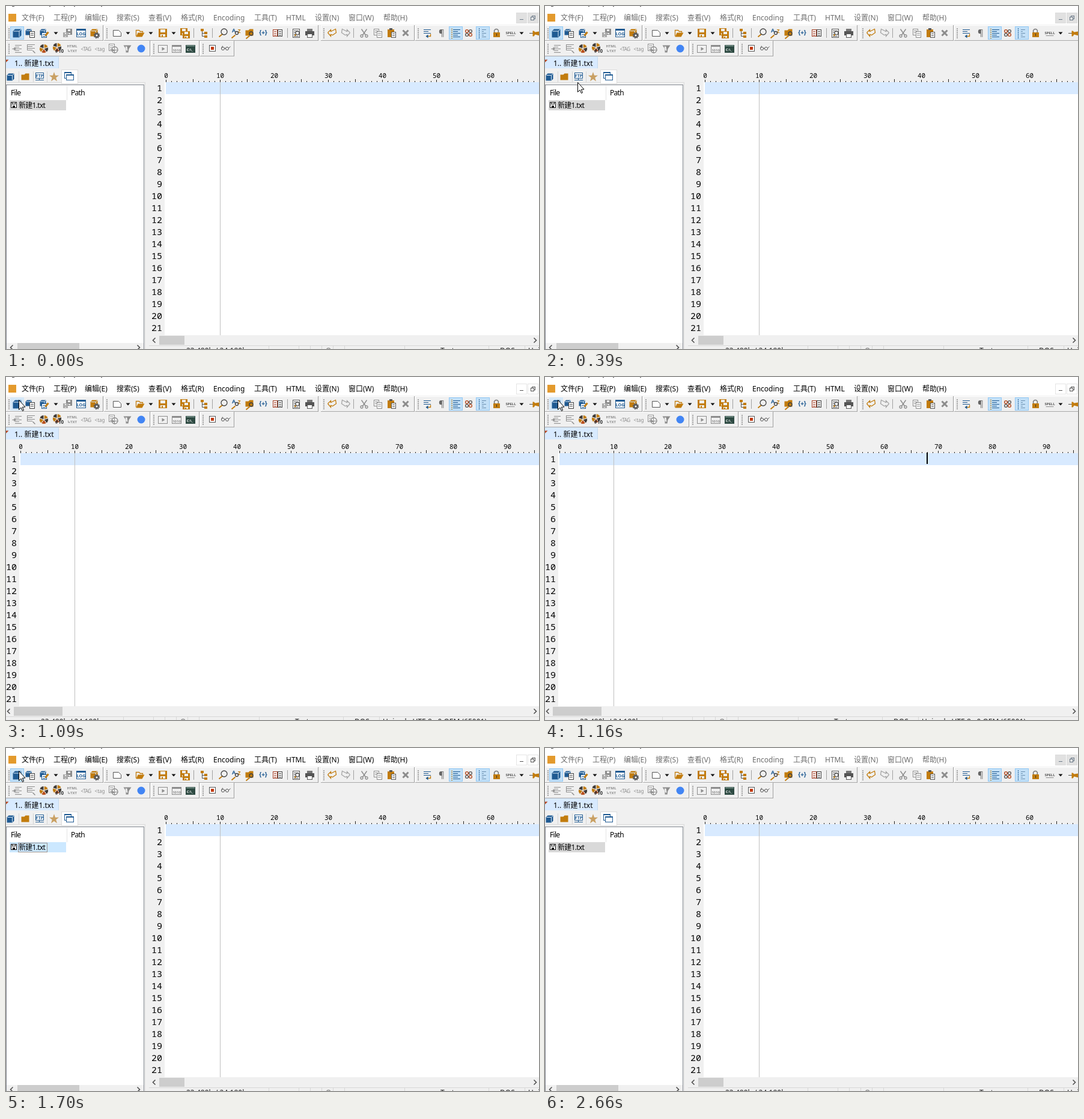
Animation, 887 px wide and 572 px high, one loop 2.73 s. Source, as an HTML page with a canvas:

```html
<!DOCTYPE html>
<html lang="zh-CN">
<head>
<meta charset="utf-8">
<style>
html, body { margin: 0; width: 100%; height: 100%; overflow: hidden; background: #f0f0f0; }
canvas { display: block; }
</style>
</head>
<body>
<canvas id="stage" width="887" height="572"></canvas>
<script>
const g = document.getElementById('stage').getContext('2d');
const LOOP = 2730, W = 887, H = 572, SHIFT = 242;
const UI = '"Noto Sans", "Noto Sans CJK SC", "Noto Sans CJK", sans-serif';
const MONO = '"Noto Sans Mono", "DejaVu Sans Mono", monospace';
const BLUE = '#1f5a92', ORANGE = '#c27c0e', GRAY = '#8c8c8c', DARK = '#404040';
const FACE = '#f0f0f0', MARK = '#d8eaff';

// Moments of the story
const FOCUS = 1000, HIDE = 1080, CARET = 1160, PRESS = 1640, SHOW = 1700, BLUR = 2660;

// Pointer: time, x, y; each pose holds until the next
const path = [
  [70, 484, 387], [140, 372, 320], [210, 240, 242], [270, 138, 181], [330, 76, 143],
  [390, 54, 127], [460, 53, 112], [540, 53, 98], [620, 47, 78], [690, 35, 53],
  [770, 27, 39], [920, 21, 38], [1930, 60, 78], [2000, 260, 232], [2080, 777, 553], [2170]
];

function rect(x, y, w, h, c) { g.fillStyle = c; g.fillRect(x, y, w, h); }
function frame(x, y, w, h, c, fill) {
  if (fill) rect(x, y, w, h, fill);
  g.strokeStyle = c; g.lineWidth = 1; g.strokeRect(x + .5, y + .5, w - 1, h - 1);
}
function trace(p) {
  g.beginPath();
  for (let i = 0; i < p.length; i += 2) g.lineTo(p[i] + .5, p[i + 1] + .5);
}
function line(c, w, ...p) { trace(p); g.strokeStyle = c; g.lineWidth = w; g.stroke(); }
function poly(c, ...p) { trace(p); g.closePath(); g.fillStyle = c; g.fill(); }
function disc(x, y, r, c) { g.beginPath(); g.arc(x, y, r, 0, 7); g.fillStyle = c; g.fill(); }
function ring(x, y, r, c, w = 1.3) {
  g.beginPath(); g.arc(x, y, r, 0, 7); g.strokeStyle = c; g.lineWidth = w; g.stroke();
}
function text(s, x, y, c = '#000', size = 12, font = UI, align = 'left', gap = 0) {
  g.font = size + 'px ' + font; g.textAlign = align; g.letterSpacing = gap + 'px';
  g.fillStyle = c; g.fillText(s, x, y);
}
function label(s, x, y, c, size) { text(s, x, y, c, 'bold ' + size, UI, 'center'); }

// Icons, placed by their centre
function cube(x, y, c = BLUE, r = 7) {
  poly(c, x - r, y - r / 2, x - r / 2, y - r, x + r, y - r, x + r, y + r / 2, x + r / 2, y + r, x - r, y + r);
  line('#dcebf7', 1, x - r + 1, y - r / 2, x + r / 2, y - r / 2, x + r / 2, y + r - 1);
  line('#dcebf7', 1, x + r / 2, y - r / 2, x + r, y - r);
}
function page(x, y, c, w = 9, h = 11) {
  frame(x - (w >> 1), y - (h >> 1), w, h, c, '#fff');
  for (let i = 3; i < h - 2; i += 3) rect(x - (w >> 1) + 2, y - (h >> 1) + i, w - 4, 1, c);
}
function floppy(x, y, c, r = 7) {
  rect(x - r, y - r, 2 * r, 2 * r, c);
  rect(x - r + 3, y - r + 1, 2 * r - 6, r - 2, FACE);
  rect(x - r + 3, y + 2, 2 * r - 6, r - 3, FACE);
  rect(x - 2, y + 3, 2, r - 4, c);
}
function folder(x, y, c = ORANGE) {
  poly(c, x - 7, y - 4, x - 2, y - 4, x, y - 6, x + 6, y - 6, x + 6, y + 5, x - 7, y + 5);
}
function lens(x, y, c, r = 4) {
  line(ORANGE, 2, x - 7, y + 6, x - 1, y + 1);
  ring(x + 2, y - 2, r, c);
}
function drop(x, y) { poly('#111', x - 4, y - 2, x + 3, y - 2, x - .5, y + 2); }
function rows(x, y, c, n = 5, w = 11) {
  for (let i = 0; i < n; i++) rect(x - 5, y - 6 + i * 3, i % 2 ? w - 4 : w, 1, c);
}
function pie(x, y) {
  [ORANGE, '#3f3a36', '#b8501e', ORANGE, '#3f3a36'].forEach((c, i) => {
    g.beginPath(); g.moveTo(x, y);
    g.arc(x, y, 7.5, i * 1.257 - 1.57, i * 1.257 - .31);
    g.closePath(); g.fillStyle = c; g.fill();
    g.strokeStyle = FACE; g.lineWidth = 1; g.stroke();
  });
}
function back(x, y, c, d) {
  line(c, 1.3, x - 7 * d, y - 1, x - 2 * d, y - 6, x - 2 * d, y - 3, x + 6 * d, y - 7,
    x + 7 * d, y - 1, x + 1 * d, y + 3, x - 2 * d, y + 2, x - 2 * d, y + 5, x - 7 * d, y - 1);
}
function pressed(x, fill = '#c3e0f7', edge = '#90c8f6') { frame(x, 34, 23, 22, edge, fill); }
function sep(x) { rect(x, 37, 1, 16, '#a0a0a0'); }
function band(x, y, end) {
  rect(x, y + 25, end - x, 1, '#a8a8a8');
  rect(end - 1, y, 1, 26, '#a0a0a0');
  rect(x, y, 1, 25, '#fff'); rect(x, y, end - x - 1, 1, '#fff');
  for (let i = 5; i < 22; i += 3) rect(x + 4, y + i, 2, 2, '#a6a6a6');
}

function menu(active) {
  rect(0, 0, W, 31, '#fff');
  [10, 72, 96, 113, 158].forEach((x, i) => rect(x, 0, i ? 2 : 4, 1, '#555'));
  rect(4, 13, 13, 13, '#e39a2d');
  const c = active ? '#000' : '#6d6d6d';
  const items = ['文件(F)', '工程(P)', '编辑(E)', '搜索(S)', '查看(V)', '格式(R)', 'Encoding',
    '工具(T)', 'HTML', '设置(N)', '窗口(W)', '帮助(H)'];
  [26, 79, 131, 184, 237, 291, 345, 413, 466, 514, 570, 628].forEach((x, i) => text(items[i], x, 24, c));
  for (const x of [849, 868]) frame(x, 11, 18, 18, active ? '#e5e5e5' : '#dcdcdc', active ? '#fff' : '#e1e1e1');
  const m = active ? '#555' : '#6c7a89';
  rect(855, 22, 6, 1, m);
  frame(875, 16, 6, 6, m); frame(873, 18, 6, 6, m, active ? '#fff' : '#e1e1e1'); rect(873, 18, 6, 1, m);
}

function topBar(panel) {
  const y = 45;
  band(0, 32, 162); band(163, 32, 520); band(524, 32, 680); band(681, 32, 890);
  panel ? pressed(7) : pressed(7, '#d5e8f8', '#d5e8f8');
  cube(18, y);
  cube(37, y - 2, BLUE, 5); page(43, y + 2, DARK);
  cube(61, y - 2, BLUE, 5); page(63, y + 3, BLUE, 9, 9); line(ORANGE, 3, 65, 49, 70, 43);
  drop(83, y);
  floppy(105, y - 2, GRAY, 5); floppy(99, y + 3, '#aaa', 4);
  frame(117, 38, 16, 14, BLUE, '#fff'); rect(117, 38, 16, 3, BLUE); label('LOG', 125, 49, BLUE, 7);
  cube(146, y - 1, ORANGE, 6); disc(151, 49, 4, '#5a5a5a'); disc(151, 49, 1.5, '#fff');
  g.setLineDash([2, 1.5]); ring(151, 49, 4.5, '#5a5a5a', 1.5); g.setLineDash([]);

  poly('#fff', 178, 40, 187, 40, 191, 44, 191, 50, 178, 50);
  line('#555', 1, 178, 40, 187, 40, 191, 44, 191, 50, 178, 50, 178, 40);
  drop(203, y);
  line(ORANGE, 1.3, 216, 50, 216, 40, 221, 40, 223, 42, 227, 42, 227, 44);
  poly(ORANGE, 216, 51, 219, 44, 230, 44, 226, 51);
  drop(241, y); floppy(261, y, ORANGE); drop(279, y);
  floppy(296, y - 2, ORANGE, 6); floppy(300, y + 3, ORANGE, 6); sep(312);
  line('#555', 1, 326, 40, 326, 50, 331, 50); line('#555', 1, 326, 45, 331, 45);
  rect(324, 38, 5, 4, ORANGE); rect(330, 43, 5, 4, ORANGE); rect(330, 49, 5, 4, ORANGE); sep(343);
  lens(361, y, DARK, 5);
  label('A', 379, 44, BLUE, 9); label('Z', 388, 45, ORANGE, 8); lens(382, 47, DARK, 2.5);
  folder(405, 44); lens(406, 48, DARK, 3);
  label('{+}', 428, 48, BLUE, 10);
  page(448, y, '#a33b20', 8, 12); page(456, y, DARK, 8, 12); sep(468);
  page(483, y, '#555', 12, 15); disc(485, 45, 3, '#fff'); ring(485, 45, 3, DARK, 1.2); line(ORANGE, 2, 480, 49, 482, 47);
  rect(501, 38, 9, 5, '#777'); rect(498, 42, 15, 7, '#555'); frame(501, 46, 9, 7, '#555', '#fff');

  back(542, y, ORANGE, 1); back(565, y, '#a5a5a5', -1); sep(578);
  line(GRAY, 1.4, 591, 38, 598, 48); line(GRAY, 1.4, 600, 38, 593, 48);
  ring(592, 50, 2, GRAY); ring(600, 50, 2, GRAY);
  page(616, y - 2, GRAY, 9, 11); page(621, y + 2, GRAY, 9, 11);
  rect(635, 39, 11, 13, ORANGE); rect(638, 37, 5, 3, '#555'); page(645, y + 3, '#555', 8, 10);
  line(GRAY, 3, 660, 40, 669, 49); line(GRAY, 3, 669, 40, 660, 49);

  rows(700, y, BLUE, 3, 12); line(ORANGE, 1.4, 706, 46, 706, 50, 699, 50); poly(BLUE, 698, 50, 702, 47, 702, 53);
  text('¶', 725, 50, '#666', 15, UI, 'center');
  pressed(737); rows(749, y, BLUE, 5, 12);
  for (let i = 38; i < 54; i += 3) rect(741, i, 2, 1, ORANGE);
  ring(767, 42, 2.4, '#b3471d'); ring(773, 42, 2.4, '#555'); ring(767, 48, 2.4, '#555'); ring(773, 48, 2.4, '#b3471d');
  pressed(782); rows(797, y, '#6b8fb0', 5, 7);
  for (let i = 37; i < 54; i += 3) rect(787, i, 1, 2, BLUE);
  ring(816, 42, 3.5, '#777', 1.6); rect(811, 44, 11, 8, ORANGE); rect(816, 46, 1, 4, '#333');
  label('SPELL', 840, 47, '#555', 6); line(GRAY, 1, 833, 49, 846, 49); drop(858, y);
  rect(871, 45, 6, 1, '#555'); poly(ORANGE, 876, 41, 878, 41, 880, 43, 887, 42, 887, 49, 880, 47, 878, 50, 876, 50);
}

function lowBar() {
  const y = 71;
  band(0, 58, 240); band(241, 58, 322); band(323, 58, 380);
  rows(20, y, GRAY, 5, 11); line(GRAY, 1.3, 10, 71, 15, 71); poly(GRAY, 13, 68, 17, 71, 13, 74);
  rows(41, y - 1, GRAY, 4, 12); rect(35, 64, 1, 10, GRAY); line(GRAY, 1.5, 44, 74, 48, 78);
  pie(63, 71); pie(85, 69); label('#10', 89, 78, '#333', 8);
  label('HTML', 110, 69, GRAY, 6); label('↳TXT', 110, 77, GRAY, 6);
  text('<TAG', 133, 75, GRAY, 8, UI, 'center', -.5); text('<tag', 156, 75, GRAY, 8, UI, 'center');
  page(176, 69, GRAY, 10, 12); ring(181, 73, 5, GRAY); line(GRAY, 1, 176, 73, 186, 73); line(GRAY, 1, 180, 68, 180, 78);
  poly(GRAY, 195, 65, 208, 65, 204, 71, 203, 77, 199, 77, 199, 71);
  poly(FACE, 198, 67, 201, 67, 202, 74, 200, 74);
  disc(225, 71, 6.5, '#4285f4');
  frame(253, 65, 16, 13, GRAY); poly(GRAY, 259, 68, 264, 71, 259, 74);
  frame(276, 65, 16, 13, GRAY); rect(276, 65, 16, 3, GRAY); label('1010', 284, 76, GRAY, 6);
  rect(299, 65, 16, 13, '#2d4a42'); rect(300, 66, 14, 1, '#9db5ad'); label('C:\\_', 306, 75, '#fff', 6);
  frame(338, 65, 11, 11, '#555', '#fff'); rect(341, 68, 5, 5, '#c23a12');
  ring(361, 71, 2.5, '#555', 1); ring(368, 71, 2.5, '#555', 1);
  line('#555', 1, 363, 70, 365, 70); line('#555', 1, 358, 70, 360, 66); line('#555', 1, 370, 70, 373, 67);
}

function arrow(x, y, d) { line('#505050', 1.6, x + 2 * d, y - 4, x - 2 * d, y, x + 2 * d, y + 4); }

function sidePanel(focus) {
  rect(0, 127, 231, 1, '#dcdcdc');
  rect(231, 127, 1, H, '#dcdcdc');
  for (const x of [21, 45, 68]) rect(x, 109, 1, 18, '#d5d5d5');
  frame(92, 106, 28, 24, '#dcdcdc', '#fff');
  cube(7, 118, BLUE, 6); folder(32, 118);
  frame(49, 111, 14, 10, BLUE, '#fff'); label('FTP', 56, 119, BLUE, 7);
  rect(55, 121, 1, 3, BLUE); rect(49, 123, 14, 1, BLUE);
  const star = [];
  for (let i = 0; i < 10; i++) {
    const r = i % 2 ? 3.4 : 8.5, a = i * Math.PI / 5;
    star.push(79.5 + r * Math.sin(a), 118 - r * Math.cos(a));
  }
  poly('#c9a063', ...star);
  frame(97, 110, 12, 11, BLUE, '#fff'); rect(97, 110, 12, 2, BLUE);
  frame(100, 114, 13, 10, BLUE, '#fff'); rect(100, 114, 13, 2, BLUE);

  frame(0, 131, 230, 450, '#828790', '#fff');
  rect(101, 133, 1, 24, '#e3e3e3');
  text('File', 8, 149, '#000', 12, UI, 'left', -.7);
  text('Path', 108, 149, '#000', 12, UI, 'left', -.7);
  rect(6, 157, 94, 17, focus ? '#cce8ff' : '#d9d9d9');
  frame(8, 160, 10, 10, '#111', '#fff'); frame(10, 160, 6, 4, '#111', '#fff'); rect(11, 166, 4, 3, '#111');
  text('新建1.txt', 21, 170, '#000', 12, UI, 'left', -.7);
  if (focus) {
    g.setLineDash([1, 1]); frame(20, 158, 49, 16, '#6b3d18'); g.setLineDash([]);
  }
  rect(1, 562, 228, 10, FACE); rect(19, 562, 103, 10, '#cdcdcd');
  arrow(9, 569, 1); arrow(220, 569, -1);
}

function editor(panel) {
  const dx = panel ? SHIFT : 0;
  g.save();
  g.translate(dx, 0);
  g.beginPath(); g.rect(-4, 104, W + 4, H); g.clip();
  rect(22, 127, W, 422, '#fff');
  rect(24, 127, W, 20, MARK);
  for (let i = 0; i < 98; i++) {
    const h = i % 10 == 0 ? 4 : i % 5 == 0 ? 5 : 2;
    rect(24 + i * 9, 127 - h, 1, h, '#222');
    if (i % 10 == 0) text(i, 24.5 + i * 9, 120, '#000', 11, MONO, 'center');
  }
  for (let i = 1; i < 22; i++) text(i, 18, 122 + i * 20, '#000', 15, MONO, 'right');
  rect(114, 127, 1, 422, '#c0c0c0');

  rect(-4, 549, W + 4, 17, FACE);
  rect(13, 550, panel ? 42 : 81, 15, '#cdcdcd');
  arrow(4, 557, 1); arrow(880 - dx, 557, -1);
  rect(-4, 566, W + 4, 6, FACE);
  rect(-4, 566, W + 4, 1, '#d7d7d7');
  for (const x of [195, 245, 264, 283, 302, 321, 421, 561, 621]) rect(x, 567, 1, 5, '#d7d7d7');
  text('23,489b / 24,180b', 58, 579, '#222');
  text('O', 290, 579, '#777');
  text('Text', 481, 579, '#222');
  text('DOS', 580, 579, '#222');
  text('Unicode UTF-8 , 0 OEM (65001)', 627, 579, '#222');
  g.restore();
}

function pointer(x, y) {
  const p = [x, y, x, y + 16, x + 3.5, y + 12.5, x + 6, y + 18, x + 8, y + 17, x + 5.8, y + 11.7, x + 10.5, y + 11.5];
  poly('#fff', ...p);
  line('#000', 1, ...p, x, y);
}

function draw(t) {
  const panel = t < HIDE || t >= SHOW;
  rect(0, 0, W, H, FACE);
  menu(t >= FOCUS && t < BLUR);
  topBar(panel);
  lowBar();
  rect(0, 84, 88, 20, MARK);
  rect(87, 85, 1, 19, '#c5d9ed');
  poly('#b8431c', -1, 89, 4, 89, -1, 94);
  text('1.. 新建1.txt', 14, 100);
  editor(panel);
  if (panel) sidePanel(t >= SHOW && t < BLUR);
  if (t >= CARET && t < PRESS) rect(635, 126, 2, 19, '#000');
  const pose = path.findLast(p => p[0] <= t);
  if (pose?.length == 3) pointer(pose[1], pose[2]);
}

let start;
function tick(now) {
  start ??= now;
  draw((now - start) % LOOP);
  requestAnimationFrame(tick);
}
draw(0);
requestAnimationFrame(tick);
</script>
</body>
</html>
```
